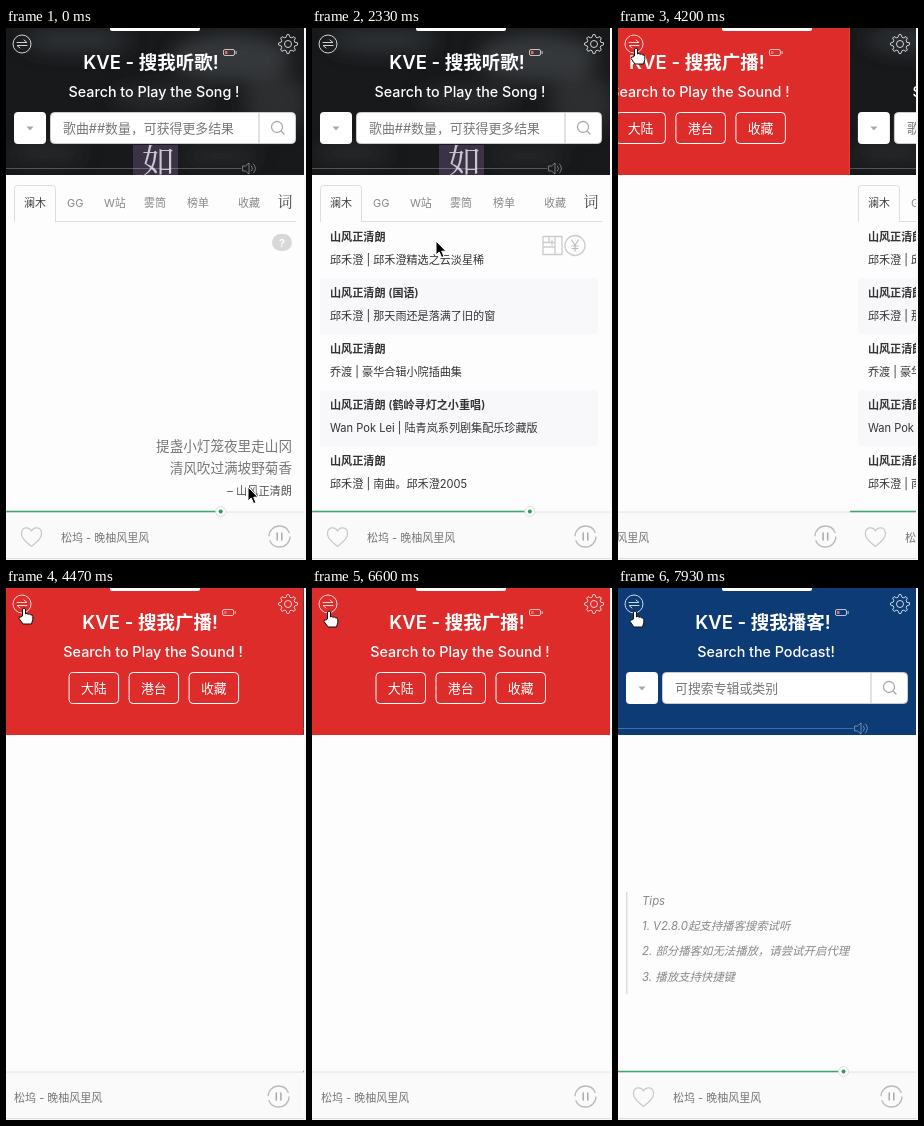
Animation of 300x532 px, one loop 8 s. Source, as an HTML page:

```html
<!DOCTYPE html>
<html lang="zh-CN">
<head>
<meta charset="utf-8">
<style>
html, body { margin: 0; width: 100%; height: 100%; overflow: hidden; background: #f8f8f8; }
svg { display: block; }
text { font-family: Inter, "Noto Sans CJK SC", "Noto Sans CJK", sans-serif; white-space: pre; }
.brush { font-family: "Noto Serif CJK SC", "Noto Sans CJK SC", serif; }
.line { fill: none; stroke-linecap: round; stroke-linejoin: round; }
</style>
</head>
<body>
<svg id="stage" width="300" height="532" viewBox="0 0 300 532"></svg>
<script>
const W = 298, LOOP = 8000;
const $ = id => document.getElementById(id);

const text = (x, y, size, fill, s, more = '') =>
  `<text x="${x}" y="${y}" font-size="${size}" fill="${fill}" ${more}>${s}</text>`;
const rect = (x, y, w, h, fill, more = '') =>
  `<rect x="${x}" y="${y}" width="${w}" height="${h}" fill="${fill}" ${more}/>`;
const line = (d, stroke, width = 1, more = '') =>
  `<path class="line" d="${d}" stroke="${stroke}" stroke-width="${width}" ${more}/>`;
const ring = (x, y, r, stroke, width = 1, more = '') =>
  `<circle cx="${x}" cy="${y}" r="${r}" fill="none" stroke="${stroke}" stroke-width="${width}" ${more}/>`;
const MID = 'text-anchor="middle"', END = 'text-anchor="end"', BOLD = 'font-weight="600"';

const heading = (title, sub) =>
  text(145, 40.5, 18.5, '#fff', title, MID + ' ' + BOLD) +
  text(148, 69, 14.3, '#fff', sub, MID + ' font-weight="500"') +
  rect(217.5, 21.5, 11, 6, 'none', 'rx="1.5" stroke="#fff" stroke-opacity=".7"') +
  rect(219, 23, 2.5, 3, '#e66') + rect(229.5, 23, 1.2, 3, '#fff', 'opacity=".6"');

const searchRow = hint =>
  rect(8, 84, 32, 32, '#fff', 'rx="4"') +
  '<path d="M20.500 98.500h7l-3.500 4z" fill="#aaa"/>' +
  rect(44.500, 84.500, 245, 31, '#fff', 'rx="4" stroke="#ccc"') +
  line('M253 84.500V115.500', '#c4c4c4') +
  text(57, 104.700, 12.900, '#777', hint) +
  ring(271, 99, 5.500, '#aaa', 1.300) + line('M275 103l3 3', '#aaa', 1.300);

const volume =
  line('M0 140.500H235', '#fff', 1, 'opacity=".25"') +
  line('M237 138h2.500l3.500-3v11l-3.500-3h-2.500zM245.500 138q2 2.500 0 5M247.500 136q4 4.500 0 9', '#fff', 1, 'opacity=".4"');

const footer = x =>
  rect(0, 484, W, 46, '#fafafa') + line('M0 484H298', '#e2e2e2') +
  text(x, 513.500, 11, '#777', '松坞 - 晚柚风里风') +
  ring(273.500, 508.500, 10.500, '#bbb', 1.300, 'stroke-dasharray="29 4"') +
  line('M271.200 505v7M275.800 505v7', '#aaa', 1.500);

const player = name =>
  footer(55) +
  line('M25.500 518.500C20 514 15.500 510.500 15.500 505.500C15.500 499 23 498 25.500 503C28 498 35.500 499 35.500 505.500C35.500 510.500 31 514 25.500 518.500z', '#c8c8c8', 1.200) +
  `<path id="${name}Bar" stroke="#3aa866" stroke-width="1.600"/>
   <g id="${name}Dot"><circle r="5" fill="#fff" stroke="#ddd"/><circle r="2" fill="#2a9d58"/></g>`;

const blob = (x, y, rx, ry, fill, o) =>
  `<ellipse cx="${x}" cy="${y}" rx="${rx}" ry="${ry}" fill="${fill}" opacity="${o}"/>`;
const inkHeader = rect(0, 0, W, 147, '#17191b') +
  `<svg width="298" height="147"><g filter="url(#soft)">` +
  blob(70, 12, 55, 14, '#565a5e', .35) + blob(225, 30, 60, 24, '#5b5f63', .45) +
  blob(270, 75, 32, 30, '#555', .35) + blob(155, 70, 50, 12, '#444', .4) +
  blob(40, 125, 40, 9, '#444', .4) + blob(215, 128, 40, 10, '#444', .35) +
  `</g></svg>` +
  rect(127, 117, 45, 30, '#43384f', 'opacity=".85"') +
  text(136, 145, 33, '#c9c8cf', '如', 'class="brush"');

const tabs =
  line('M49.500 193.500V160.500q0-3-3-3H11.500q-3 0-3 3V193.500M49.500 193.500H290', '#ddd') +
  text(18, 179, 11, '#444', '澜木', 'font-weight="500"') +
  [[61, 'GG'], [98, 'W站'], [138, '雾筒'], [181, '榜单'], [232, '收藏']]
    .map(([x, s]) => text(x, 179, 11, '#888', s)).join('') +
  text(271.500, 178.500, 15, '#444', '词', 'class="brush"');

const quote =
  rect(266, 206, 20, 17, '#d8d8d8', 'rx="8.500"') + text(276, 218.500, 11, '#fff', '?', MID + ' ' + BOLD) +
  text(286, 423, 13.600, '#777', '提盏小灯笼夜里走山冈', END) +
  text(286, 445, 13.600, '#777', '清风吹过满坡野菊香', END) +
  text(286, 467, 11.200, '#555', '– 山风正清朗', END);

const songs = [
  ['山风正清朗', '邱禾澄 | 邱禾澄精选之云淡星稀'],
  ['山风正清朗 (国语)', '邱禾澄 | 那天雨还是落满了旧的窗'],
  ['山风正清朗', '乔渡 | 豪华合辑小院插曲集'],
  ['山风正清朗 (鹤岭寻灯之小重唱)', 'Wan Pok Lei | 陆青岚系列剧集配乐珍藏版'],
  ['山风正清朗', '邱禾澄 | 南曲。邱禾澄2005']
];
const list = songs.map(([name, info], i) =>
  (i % 2 ? rect(8, 194 + 56 * i, 278, 56, '#f8f8fa') : '') +
  text(18, 213 + 56 * i, 11.100, '#333', name, BOLD) +
  text(18, 235.500 + 56 * i, 11.100, '#333', info)).join('');
const rowIcons =
  line('M231 208.500h19v18h-19zM237 208.500v6h-6M243 208.500v18M231 219h12M240 212v5M237.500 214.500h5', '#ccc', 1.300) +
  ring(263, 217.500, 10, '#ccc', 1.300) +
  line('M259.500 212l3.500 5 3.500-5M263 217v6M260 218h6M260 220.500h6', '#bbb', 1.200);

const blank = rect(0, 0, W, 530, '#fdfdfd');
const music = blank + inkHeader + heading('KVE - 搜我听歌!', 'Search to Play the Song !') +
  searchRow('歌曲##数量，可获得更多结果') + volume + tabs +
  `<g id="quote">${quote}</g><g id="list">${list}</g><g id="rowIcons">${rowIcons}</g>` + player('music');

const radio = blank + rect(0, 0, W, 147, '#dd2c2a') +
  heading('KVE - 搜我广播!', 'Search to Play the Sound !') +
  ['大陆', '港台', '收藏'].map((s, i) =>
    rect(64 + 60 * i, 84.500, 49.500, 31, 'none', 'rx="4" stroke="#fff"') +
    text(88.700 + 60 * i, 104.700, 12.900, '#fff', s, MID + ' font-weight="500"')).join('') + footer(9);

const tips = ['Tips', '1. V2.8.0起支持播客搜索试听', '2. 部分播客如无法播放，请尝试开启代理', '3. 播放支持快捷键'];
const podcast = blank + rect(0, 0, W, 147, '#0d3b76') +
  heading('KVE - 搜我播客!', 'Search the Podcast!') + searchRow('可搜索专辑或类别') + volume +
  rect(8, 304, 1.500, 102, '#ddd') +
  tips.map((s, i) => text(24, 317 + 25.200 * i, 11.400, '#888', s, 'font-style="italic"')).join('') +
  player('podcast');

// eight-toothed wheel
const gear = 'M' + Array.from({ length: 32 }, (_, i) => {
  const a = (i - .5) * Math.PI / 16, r = i % 4 < 2 ? 9.500 : 7;
  return (282 + r * Math.cos(a)).toFixed(1) + ' ' + (16 + r * Math.sin(a)).toFixed(1);
}).join('L') + 'z';

$('stage').innerHTML = `
  <defs><filter id="soft" x="-50%" y="-50%" width="200%" height="200%"><feGaussianBlur stdDeviation="9"/></filter></defs>
  ${rect(0, 0, 300, 532, '#f8f8f8')}
  <svg width="${W}" height="532">
    <g id="p0">${music}</g><g id="p1">${radio}</g><g id="p2">${podcast}</g>
  </svg>
  ${line('M0 530.500H298', '#ddd')}
  <path d="M104 0h90v1q0 2-2 2h-86q-2 0-2-2z" fill="#fff"/>
  <g opacity=".8">
    ${ring(16, 16, 9, '#fff')}${line('M11 14.500h10l-3-2.500M21 17.500h-10l3 2.500', '#fff')}
    ${line(gear, '#fff')}${ring(282, 16, 3.500, '#fff')}
  </g>
  <path id="arrow" d="M0 0V14L3.200 11L5.600 16.500L8 15.500L5.700 10.200H10z" fill="#000" stroke="#fff"/>
  <path id="hand" d="M-1.500 8V1Q0-1 1.500 1V6Q3 4.500 4 6.300Q5.500 5 6.500 7Q8.500 6 8.800 8.500V11.500L7.500 16H-1L-5 10.500Q-5 8-3 9z" fill="#fff" stroke="#111"/>`;

function ease(u) {
  if (u <= 0) return 0;
  if (u >= 1) return 1;
  let lo = 0, hi = 1, s;
  for (let i = 0; i < 24; i++) {
    s = (lo + hi) / 2;
    if (.75 * s * (1 - s) + s ** 3 < u) lo = s; else hi = s;
  }
  return .3 * s * (1 - s) ** 2 + 3 * s * s * (1 - s) + s ** 3;
}

// pointer stops: time, x, y
const stops = [[0, 242, 459], [70, 242, 459], [430, 272, 98], [500, 272, 98], [730, 133, 34], [900, 133, 34],
  [1640, 19, 8], [1760, 19, 8], [2330, 124, 213], [2600, 124, 213], [3400, 20, 24], [3730, 18, 20],
  [4730, 18, 20], [5200, 75, 85], [5670, 52, 45], [6330, 17, 23], [8000, 17, 23]];
function pointer(t) {
  const i = stops.findIndex(s => s[0] > t), [a, x, y] = stops[i - 1], [b, x2, y2] = stops[i];
  const u = (t - a) / (b - a), k = u * u * (3 - 2 * u);
  return [x + (x2 - x) * k, y + (y2 - y) * k];
}

const move = (id, x, y) => $(id).setAttribute('transform', `translate(${x} ${y})`);
const show = (id, on) => $(id).style.display = on ? '' : 'none';

function draw(t) {
  const page = ease((t - 3915) / 600) + ease((t - 6679) / 600);
  for (let i = 0; i < 3; i++) move('p' + i, (page - i) * W, 0);

  const played = 214.700 + Math.floor(t / 250) * .35;
  for (const name of ['music', 'podcast']) {
    $(name + 'Bar').setAttribute('d', `M0 483.500H${played}`);
    move(name + 'Dot', played, 483.500);
  }

  const [x, y] = pointer(t), listed = t >= 900;
  show('quote', !listed);
  show('list', listed);
  show('rowIcons', listed && t < 3400 && y > 194 && y < 250);

  const onButton = Math.hypot(x - 16, y - 16) < 12 || (x > 253 && y > 84 && y < 116);
  show('hand', onButton);
  show('arrow', !onButton);
  move(onButton ? 'hand' : 'arrow', x, y);
}

function tick() {
  draw(performance.now() % LOOP);
  requestAnimationFrame(tick);
}
tick();
</script>
</body>
</html>
```
